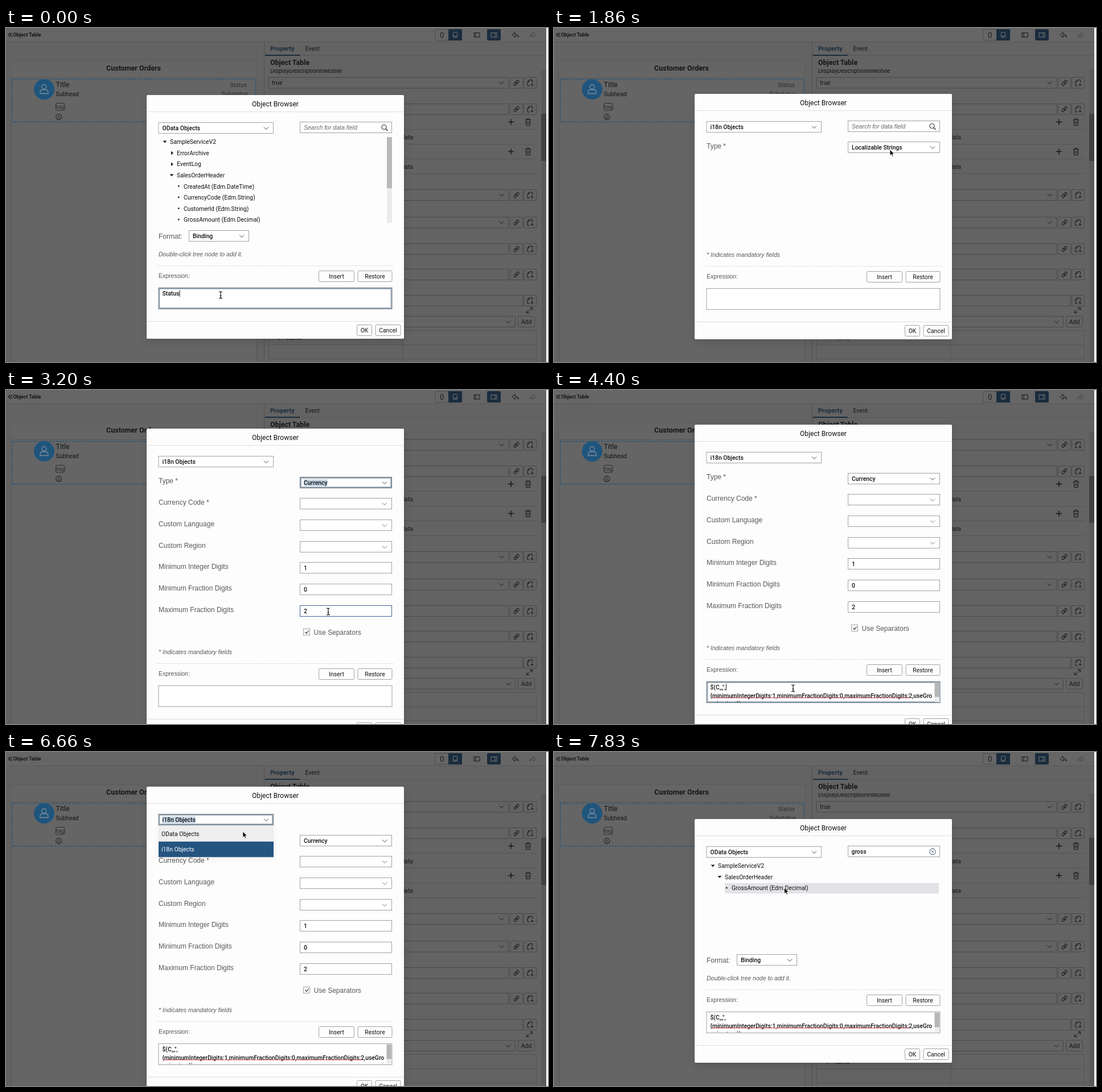
Recreate the animation shown at these times as an HTML page. Size 952 by 588 pixels, loop 8000 ms.

```html
<!DOCTYPE html>
<html lang="en">
<head>
<meta charset="utf-8">
<title>Object Browser</title>
<style>
  html, body { margin: 0; width: 100%; height: 100%; overflow: hidden; background: #fff; }
  svg { display: block; position: absolute; left: 0; top: 0; }
  text { font: 10.4px Roboto, sans-serif; white-space: pre; }
  .value { font-weight: 500; }
  .label { font-family: "Liberation Sans", Arial, sans-serif; }
  .hint { font-family: "Liberation Sans", Arial, sans-serif; font-style: italic; }
</style>
</head>
<body>
<svg width="952" height="588" viewBox="0 0 952 588">
  <defs>
    <filter id="soft" x="-20%" y="-20%" width="140%" height="140%"><feGaussianBlur stdDeviation="7"/></filter>
    <clipPath id="scrollArea"><rect x="455" y="72.5" width="485" height="516"/></clipPath>
  </defs>
  <g id="page"></g><g id="dialog"></g><g id="pointer"></g>
</svg>
<script>
const LOOP = 8000;
const $ = id => document.getElementById(id);
const rect = (x, y, w, h, fill = 'none', stroke = 'none', more = '') =>
  `<rect x="${x}" y="${y}" width="${w}" height="${h}" fill="${fill}" stroke="${stroke}" ${more}/>`;
const path = (d, stroke = '#333', width = 1, fill = 'none', more = '') =>
  `<path d="${d}" fill="${fill}" stroke="${stroke}" stroke-width="${width}" ${more}/>`;
const circle = (x, y, r, fill, stroke = 'none', width = 1) =>
  `<circle cx="${x}" cy="${y}" r="${r}" fill="${fill}" stroke="${stroke}" stroke-width="${width}"/>`;
// y is the middle of the line of text
const text = (x, y, s, { size = 10.4, fill = '#111', bold = false, mid = false, end = false, cls = '' } = {}) =>
  `<text x="${x}" y="${y + size * .36}" fill="${fill}" class="${cls}" style="font-size:${size}px;${bold ? 'font-weight:700' : ''}"
   text-anchor="${mid ? 'middle' : end ? 'end' : 'start'}">${s}</text>`;
const at = (x, y, s) => `<g transform="translate(${x} ${y})">${s}</g>`;
const chevron = (x, y, color) => path(`M${x - 4} ${y - 2}l4 4l4 -4`, color);

const pen = document.createElement('canvas').getContext('2d');
const widthOf = s => { pen.font = '500 10.4px Roboto, sans-serif'; return pen.measureText(s).width; };

// ---- dimmed page behind the dialog ----
const INK = '#141617', EDGE = '#46494b', NAVY = '#1a2c3d', BLUE = '#1f557d';

const linkIcon = (x, y) => at(x, y, `<g transform="rotate(-45)">${
  rect(-5.5, -2, 6, 4, 'none', INK, 'rx="2"') + rect(-.5, -2, 6, 4, 'none', INK, 'rx="2"')}</g>`);
const sheetIcon = (x, y) => at(x, y, path('M-1 5h-3.500v-7l3 -3h5.500v5M-1.500 -5v3h-3M1 3.500h5M3.500 1v5', INK));
const trash = (x, y) => at(x, y, path('M-5 -4h10M-2 -4v-2h4v2M-4 -4l.7 10h6.600l.7 -10M-1.300 -1.500v5M1.300 -1.500v5', INK));
const plus = (x, y) => path(`M${x - 5} ${y}h10M${x} ${y - 5}v10`, INK, 1.5);
const person = (x, y, k, color) => at(x, y, `<g transform="scale(${k})">${
  circle(0, -4, 4, 'none', color, 1.3) + path('M-7 8v-2q0 -5 5 -5h4q5 0 5 5v2z', color, 1.3)}</g>`);
const sideBtn = (x, y, icon) => rect(x, y - 9.5, 22, 19, 'none', EDGE, 'rx="1.5"') + icon(x + 11, y);

function fieldRow(y, { drop, value, link = true }) {
  return rect(461.5, y - 9.5, link ? 421 : 446, 19, 'none', EDGE)
    + (drop ? chevron(870.5, y, INK) : '') + (value ? text(467, y, value, { fill: INK }) : '')
    + (link ? sideBtn(885.5, y, linkIcon) : '') + sideBtn(909.5, y, sheetIcon);
}

function drawPage() {
  const ink = { fill: INK }, bold = size => ({ fill: INK, bold: true, size });
  const header = rect(0, 0, 949, 588, '#636363') + rect(0, 0, 949, 24, '#666')
    + path('M0 24.500H949', '#585858')
    + path('M7.500 8.500l-3.500 3.500l3.500 3.500M11 8.500l-3.500 3.500l3.500 3.500', INK, 1.1) + text(12.5, 12, 'Object Table', bold(8.8))
    + rect(753.5, 2.5, 47, 19, 'none', '#4b4d50', 'rx="2"') + rect(777, 2, 24, 20, NAVY)
    + rect(763.5, 8, 4.5, 8.5, 'none', INK, 'rx="1"') + rect(785.5, 7.5, 7, 9, 'none', '#777', 'rx="1"') + path('M785.500 14.500h7', '#777')
    + rect(822, 8.5, 10, 7.5, 'none', INK) + path('M825 8.500v7.500', INK)
    + rect(845, 2, 24, 20, NAVY, 'none', 'rx="2"') + rect(852, 8.5, 10, 7.5, 'none', '#777') + path('M859 8.500v7.500', '#777')
    + path('M894 7.500l-5 4.500l5 4.500v-3q4 -.5 6.500 2.500q-.8 -5 -6.500 -5.500z', INK, 1)
    + path('M926 7.500l5 4.500l-5 4.500v-3q-4 -.5 -6.500 2.500q.8 -5 6.500 -5.500z', '#424446', 1);

  const canvas = rect(8, 57.5, 433, 540, '#656565', '#5c5c5c') + path('M8 87.500H441', '#575757')
    + text(224, 70, 'Customer Orders', { ...bold(12.5), mid: true })
    + path('M9.500 168V588M440.500 168V588', '#3f5265', 1, 'none', 'stroke-dasharray="2 2"')
    + rect(11, 90.5, 427.5, 75, 'none', BLUE, 'stroke-width="1.4" stroke-dasharray="3.5 2"')
    + circle(67, 108, 18, BLUE) + person(67, 107.5, 1, '#7d8c98')
    + text(87.5, 100, 'Title', { fill: INK, size: 12.4 }) + text(87.5, 116.5, 'Subhead', ink)
    + text(423, 100, 'Status', { fill: '#2c2e31', end: true }) + text(425, 116.5, 'Substatus', { fill: '#2c2e31', end: true })
    + rect(87.5, 132.5, 15.5, 12.5, 'none', '#2c2e31', 'rx="2"') + text(95.2, 138.5, 'tag', { fill: '#2c2e31', size: 9.8, mid: true })
    + circle(92.8, 156.5, 5, 'none', INK) + person(92.8, 156.7, .36, INK);

  const fields = text(464, 75.5, 'DisplayDescriptionInMobile', ink)
    + fieldRow(96.5, { drop: true, value: 'true' }) + fieldRow(143, {})
    + [165.5, 217.5].map(y => plus(887, y) + trash(917, y) + path(`M461 ${y + 13}H932M461 ${y + 39}H932`, '#545454')
        + text(715, y + 27, 'No data', { fill: INK, end: true })).join('')
    + fieldRow(294, { drop: true }) + fieldRow(342.5, { drop: true })
    + fieldRow(389, {}) + fieldRow(434, {}) + fieldRow(480, { link: false })
    + path('M920 492.500h4.500v4.500M924 493l-4 4M919 501.500h-4.500v-4.500M915 501l4 -4', INK)
    + rect(461.5, 507.5, 433, 19, 'none', EDGE) + chevron(882.5, 517.5, INK)
    + rect(899.5, 507.5, 29, 19, 'none', EDGE, 'rx="2"') + text(914, 517, 'Add', { fill: INK, mid: true })
    + path('M461.500 588V532.500H931.500V588M461 557.500H932M461 582.500H932M696.500 532V588', '#545454')
    + path('M479 541l4 4l-4 4', INK) + text(493, 545, 'Items', ink);

  const panel = path('M453.500 25V588', '#505050') + path('M454 48.500H949', '#595959')
    + text(464, 36, 'Property', { ...bold(11), fill: NAVY }) + text(525.5, 36, 'Event', ink) + rect(455, 47, 61, 2, NAVY)
    + text(464, 60.5, 'Object Table', bold(12.4)) + `<g clip-path="url(#scrollArea)">${fields}</g>`
    + rect(940, 73, 9, 515, '#5a5a5a') + rect(940, 151, 9, 83, '#414141');
  return header + canvas + panel;
}

// ---- dialog; every y below is measured from its top ----
const BORDER = '#a0a2a5';
const EXPR = ["$(C,,,'',", '{minimumIntegerDigits:1,minimumFractionDigits:0,maximumFractionDigits:2,useGro', 'uping:true})'];
const TYPES = ['Localizable Strings', 'Number', 'Currency', 'Percentage', 'Scientific Notation', 'DateTime', 'Date', 'Time'];
const SOURCES = ['OData Objects', 'i18n Objects'];

const value = (x, y, s, size) => text(x, y, s, { size, cls: 'value' });
const focusRing = (x, y, w, h) => rect(x, y, w, h, '#fff', '#5f7182')
  + rect(x + 1.5, y + 1.5, w - 3, h - 3, 'none', '#8795a3', 'stroke-width="1.5"');

function combo(x, y, w, s, mode = '') {
  const focused = mode === 'focus';
  return (focused ? focusRing(x, y, w, 19) : rect(x, y, w, 19, '#fff', mode === 'hover' ? '#3f6696' : BORDER))
    + (mode === 'hover' ? rect(x + w - 24.5, y + .5, 24, 18, '#d9dbde') : '')
    + (focused ? rect(x + 6.5, y + 4, widthOf(s), 11.5, '#c3d3e4') : '')
    + value(x + 6.5, y + 9.5, s) + chevron(x + w - 12.5, y + 10, s ? '#444' : '#777');
}
const input = (x, y, w, s, hot) => rect(x, y, w, 19, '#fff', hot ? '#3f6696' : BORDER) + value(x + 6.5, y + 9.5, s);
const button = (x, y, w, s, off) => `<g opacity="${off ? .4 : 1}">${
  rect(x, y, w, 19, '#fdfdfd', BORDER, 'rx="2"') + text(x + w / 2, y + 9.5, s, { mid: true })}</g>`;

function dropList(x, y, w, items, selected, hover) {
  const step = 27.2, h = items.length * step + .5;
  return rect(x, y + 2, w, h, '#000', 'none', 'opacity=".05" filter="url(#soft)"') + rect(x + .5, y, w - 1, h, '#fff', '#dcdcdc')
    + items.map((s, i) => {
      const on = i === selected;
      return rect(x, y + i * step, w, step, on ? '#245480' : i === hover ? '#eeeeee' : 'none')
        + text(x + 5, y + (i + .5) * step, s, { fill: on ? '#fff' : '#111' });
    }).join('');
}

function treeRow(row, level, s, mark, lit) {
  const x = 288 + 12 * level, y = 83 + row * 19.6;
  const marks = { open: `M${x - 12.5} ${y - 2}h7l-3.500 4z`, shut: `M${x - 10} ${y - 3.5}v7l4 -3.500z`, leaf: `M${x - 10} ${y - 1.8}h2.500v2.500h-2.500z` };
  return (lit ? rect(300, y - 9, 376, 18.5, '#e2e3e7') : '') + path(marks[mark], 'none', 0, '#222') + text(x, y, s);
}
function tree(kind) {
  const root = treeRow(0, 0, 'SampleServiceV2', 'open');
  if (kind === 'none') return '';
  if (kind !== 'full')
    return root + treeRow(1, 1, 'SalesOrderHeader', 'open') + treeRow(2, 2, 'GrossAmount (Edm.Decimal)', 'leaf', kind === 'lit');
  return root + treeRow(1, 1, 'ErrorArchive', 'shut') + treeRow(2, 1, 'EventLog', 'shut') + treeRow(3, 1, 'SalesOrderHeader', 'open')
    + ['CreatedAt (Edm.DateTime)', 'CurrencyCode (Edm.String)', 'CustomerId (Edm.String)', 'GrossAmount (Edm.Decimal)']
      .map((s, i) => treeRow(4 + i, 2, s, 'leaf')).join('')
    + rect(669, 74.5, 9, 151, '#ebebeb') + rect(669, 74.5, 9, 90, '#b9b9b9');
}

function searchBox(s, focus) {
  return (focus ? focusRing(516.5, 48, 161, 19) : rect(516.5, 48, 161, 19, '#fff', BORDER))
    + (s ? value(522.5, 57.5, s) : text(523, 57.5, 'Search for data field', { size: 10.5, fill: '#666', cls: 'hint' }))
    + (s ? circle(665, 58, 5.3, 'none', '#34506e') + path('M663 56l4 4M667 56l-4 4', '#34506e')
      : circle(664, 57, 4, 'none', '#333', 1.2) + path('M667 60l3.500 3.500', '#333', 1.4));
}

const label = (x, y, s, size = 12) => text(x, y, s, { size, fill: '#55585b', cls: 'label' });
const hint = (y, s) => text(268, y, s, { size: 10.5, fill: '#55585b', cls: 'hint' });

function odataForm(s) {
  return searchBox(s.search, s.searchFocus) + tree(s.tree) + label(268, 249.5, 'Format:')
    + combo(321.5, 239, 105, 'Binding') + hint(280.5, 'Double-click tree node to add it.');
}
function currencyForm(s) {
  const rowY = i => Math.floor(86 + 37.7 * i);
  return ['Currency Code *', 'Custom Language', 'Custom Region'].map((n, i) =>
      label(268, rowY(i + 1) + 6.7, n) + combo(516.5, rowY(i + 1), 161, '')).join('')
    + ['Minimum Integer', 'Minimum Fraction', 'Maximum Fraction'].map((n, i) =>
      label(268, rowY(i + 4) + 6.7, n + ' Digits') + input(516.5, rowY(i + 4), 161, [1, 0, 2][i], s.hot && i === 2)).join('')
    + rect(522.5, 353, 11, 11, '#fff', BORDER) + path('M525.500 358.500l2.300 2.500l4 -5', '#333', 1.2)
    + label(540.5, 358.7, 'Use Separators');
}

function expression(s, y) {
  const box = s.exprFocus ? focusRing(268, y, 410, 37) : rect(268, y, 410, 37, '#fff', BORDER);
  const caret = n => rect(274.5 + n, y + 4, 1, 11.5, '#111');
  if (s.expr !== 'full') {
    return box + (s.picked ? rect(274.5, y + 4, widthOf(s.expr), 12, '#b9d3f0') : '') + value(274.5, y + 9.7, s.expr)
      + (s.exprFocus && !s.picked ? caret(widthOf(s.expr)) : '');
  }
  return box + `<svg x="269" y="${y + 1}" width="408" height="35" viewBox="269 ${y + 1} 408 35">`
    + EXPR.map((line, i) => value(274.5, y + 9.7 + i * 14.7, line, 10.3)).join('')
    + path(`M278 ${y + 28.5}H625`, '#e0314b', 1.4, 'none', 'stroke-dasharray="1.6 1.2"')
    + rect(668.5, y + 1, 9, 35, '#ededed') + rect(668.5, y + 1, 9, 26, '#b6b6b6') + '</svg>'
    + (s.exprFocus ? caret(widthOf(s.caret)) : '');
}

const FOOT = { odata: 301, strings: 304, currency: 414 };
function i18nForm(s, foot) {
  const currency = s.form === 'currency';
  return label(268, 92.3, 'Type *') + combo(516.5, currency ? 86 : 85, 161, currency ? 'Currency' : TYPES[0], s.type)
    + hint(foot - 20, '* Indicates mandatory fields') + (currency ? currencyForm(s) : searchBox(''));
}
function drawDialog(s) {
  const foot = FOOT[s.form], h = foot + 128, i18n = s.form !== 'odata';
  return at(0, s.top, rect(247, 6, 452, h, '#000', 'none', 'opacity=".12" filter="url(#soft)"')
    + rect(247, .5, 452, h, '#fdfdfd', 'none', 'rx="2"')
    + text(473, 16.2, 'Object Browser', { size: 12.1, mid: true }) + path('M247 30H699', '#dedede')
    + combo(268, 49, 201.5, SOURCES[+i18n], s.source)
    + (i18n ? i18nForm(s, foot) : odataForm(s))
    + path(`M265 ${foot}H681`, '#d9d9d9', 1, 'none', 'stroke-dasharray="2 1"')
    + label(268, foot + 18, 'Expression:', 10.5)
    + button(549.5, foot + 9, 62, 'Insert') + button(618, foot + 9, 60, 'Restore') + expression(s, foot + 39)
    + path(`M247 ${foot + 98}H699`, '#dedede')
    + button(616.5, foot + 104, 26, 'OK', s.busy) + button(649, foot + 104, 44, 'Cancel')
    + (s.list === 'source' ? dropList(268, 70, 202, SOURCES, +i18n, s.hover) : '')
    + (s.list === 'type' ? dropList(517, 106, 161, TYPES, 0, s.hover) : ''));
}

// ---- pointers; arrow is placed by its tip, the others by their middle ----
const POINTERS = {
  arrow: path('M0 0V10.500L2.500 8.200L4.200 12L6 11.200L4.400 7.600H7.600Z', '#fff', .8, '#000'),
  beam: path('M-3 -6q3 0 3 2q0 -2 3 -2M0 -4.500V4.500M-3 6q3 0 3 -2q0 2 3 2M-1.500 1.500h3', '#111', 1.2),
  hand: path('M-2.500 -5q1.300 -1 2 .5V-1l4 .8q1.500 .5 1.300 2L4 6.500H-1.500L-5 1.500q0 -1.500 1.500 -.8l1 .8z', '#000', 1.1, '#fff')
    + path('M-.2 2.500v2.500M1.500 2.500v2.500M3 2.500v2.500', '#000', .6)
};

// time, pointer, x, y, what changes from then on
const STEPS = [
  [0, 'beam', 377, 470, { top: 117.5, form: 'odata', tree: 'full', search: '', searchFocus: false, expr: 'Status', exprFocus: true,
    picked: false, source: '', type: '', list: '', hover: -1, hot: false, busy: false, caret: EXPR[0] }],
  [30, 'beam', 352, 470],
  [200, 'beam', 300, 469],
  [370, 'beam', 288, 468, { picked: true }],
  [540, 'beam', 290, 466, { picked: false, expr: '' }],
  [720, 'arrow', 345, 372],
  [890, 'arrow', 436, 222],
  [1060, 'hand', 457, 181, { exprFocus: false, source: 'hover' }],
  [1260, 'hand', 457, 181, { source: 'focus', list: 'source' }],
  [1460, 'arrow', 400, 224, { hover: 1 }],
  [1660, 'arrow', 410, 224, { form: 'strings', list: '', hover: -1 }],
  [1860, 'arrow', 590, 214, { top: 115.5, source: '' }],
  [2060, 'hand', 664, 213, { type: 'focus', list: 'type' }],
  [2260, 'arrow', 525, 368, { hover: 5 }],
  [2400, 'arrow', 527, 336, { hover: 4 }],
  [2600, 'arrow', 533, 288, { hover: 2 }],
  [3000, 'arrow', 538, 296, { form: 'currency', list: '', hover: -1 }],
  [3200, 'beam', 566, 390, { top: 67.5, hot: true }],
  [3400, 'arrow', 574, 434, { top: 60.5, hot: false }],
  [3600, 'arrow', 580, 478],
  [3800, 'arrow', 580, 490],
  [4000, 'arrow', 580, 490, { type: '', expr: 'full', exprFocus: true }],
  [4200, 'arrow', 540, 502],
  [4400, 'beam', 420, 525],
  [4600, 'beam', 318, 526],
  [4800, 'beam', 296, 526],
  [4970, 'beam', 295, 526, { caret: '$(C,' }],
  [5310, 'beam', 312, 518],
  [5480, 'arrow', 368, 346],
  [5660, 'arrow', 428, 146],
  [5860, 'arrow', 436.5, 97.5],
  [6060, 'hand', 457, 122, { exprFocus: false, source: 'hover' }],
  [6260, 'hand', 457, 122, { source: 'focus', list: 'source' }],
  [6460, 'arrow', 416, 140, { hover: 0 }],
  [6860, 'arrow', 440, 144, { form: 'odata', list: '', hover: -1, tree: 'none', busy: true }],
  [7060, 'arrow', 567.5, 153, { top: 115.5 }],
  [7260, 'beam', 572, 176, { top: 117.5, source: '', searchFocus: true, tree: 'full', busy: false }],
  [7460, 'beam', 572, 176, { search: 'gross' }],
  [7660, 'arrow', 470, 214, { tree: 'found', searchFocus: false }],
  [7830, 'arrow', 404.5, 239, { tree: 'lit' }]
];
let state = {};
const scenes = STEPS.map(([time, kind, x, y, change]) => {
  if (change) state = { ...state, ...change };
  return { time, kind, x, y, state };
});

let start, shown;
function play(now) {
  start ??= now;
  const t = (now - start) % LOOP;
  const scene = scenes.findLast(s => s.time <= t);
  if (scene !== shown) {
    if (scene.state !== shown?.state) $('dialog').innerHTML = drawDialog(scene.state);
    $('pointer').innerHTML = at(scene.x, scene.y, POINTERS[scene.kind]);
    shown = scene;
  }
  requestAnimationFrame(play);
}

$('page').innerHTML = drawPage();
requestAnimationFrame(play);
</script>
</body>
</html>
```
